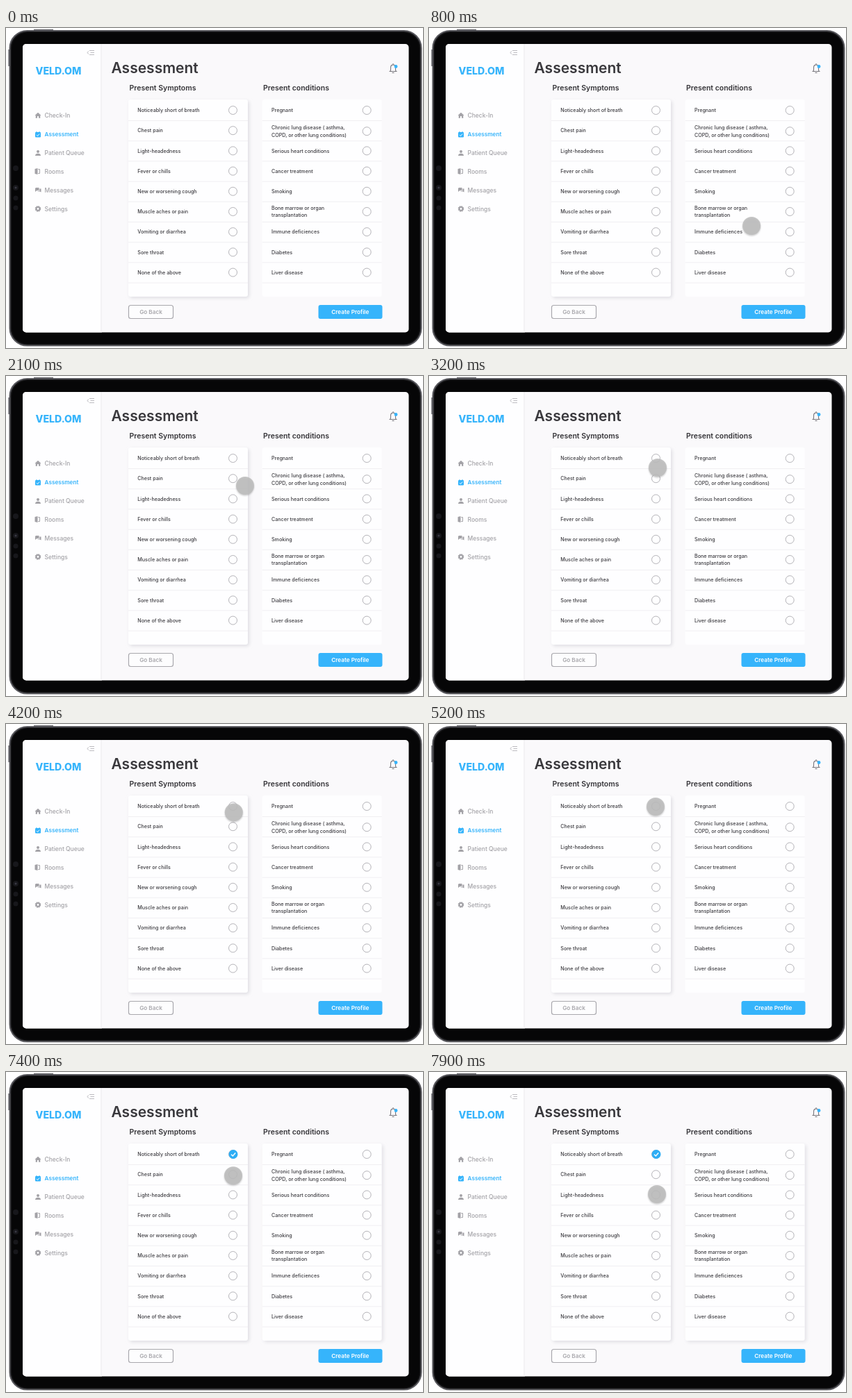
These frames come from a looping animation (600 by 461 pixels, 8 s). An HTML page:

```html
<!DOCTYPE html>
<html lang="en">
<head>
<meta charset="utf-8">
<title>Assessment</title>
<style>
  html, body { margin: 0; width: 100%; height: 100%; overflow: hidden; background: #fff; }
  svg { display: block; width: 600px; height: 461px; font-family: Inter, "Open Sans", sans-serif; }
  .item { font-size: 7.15px; font-weight: 500; fill: #3b3a3f; }
  .nav { font-size: 8.5px; font-weight: 500; fill: #a3a2a7; }
  .on { font-size: 8.2px; font-weight: 600; fill: #36b4fb; }
  .head { font-size: 10.5px; font-weight: 600; fill: #353438; }
  .btn { font-size: 8.2px; font-weight: 600; text-anchor: middle; }
  .ring { fill: none; stroke: #b4b3b8; }
  .rule { stroke: #f0eff2; }
  .icon { fill: #a3a2a7; }
</style>
</head>
<body>
<svg viewBox="0 0 600 461">
  <defs>
    <filter id="soft" x="-20%" y="-20%" width="140%" height="140%"><feGaussianBlur stdDeviation="2.5"/></filter>
    <filter id="blur" x="-40%" y="-40%" width="180%" height="180%"><feGaussianBlur stdDeviation="1.3"/></filter>
  </defs>

  <!-- tablet -->
  <path d="M40 3H68M4.500 31V55" stroke="#55555a" stroke-width="2"/>
  <rect x="5.500" y="4" width="592" height="453.500" rx="25" fill="#141416" stroke="#58585d" stroke-width="2"/>
  <rect x="8" y="6.500" width="587" height="448.500" rx="23" fill="#060607"/>
  <g fill="#17171b">
    <circle cx="14" cy="202" r="4"/><circle cx="14" cy="230" r="4"/><circle cx="14" cy="245" r="3.500"/><circle cx="14" cy="259" r="3.500"/>
  </g>
  <circle cx="14" cy="230" r="1.500" fill="#3a3a44"/>
  <rect x="24" y="23" width="555.500" height="415.500" rx="5" fill="#faf9fb"/>

  <!-- sidebar -->
  <path d="M136 23H138V438.500H136Z" fill="#f3f2f4"/>
  <path d="M29 23H136V438.500H29a5 5 0 0 1-5-5V28a5 5 0 0 1 5-5Z" fill="#fefeff"/>
  <path d="M120 32.500H127M121.500 35.500H127M120 38.500H127M119 33.500L116.800 35.500L119 37.500" fill="none" stroke="#b5b4b9" stroke-width=".9"/>
  <text x="42.500" y="67" font-size="14.200" font-weight="800" fill="#36b4fb">VELD.OM</text>
  <g class="icon">
    <path d="M41.500 126L46 121.800L50.500 126H49.300V129.800H47V127H45V129.800H42.700V126Z"/>
    <circle cx="46" cy="178" r="2"/><path d="M42 184C42 179.800 50 179.800 50 184Z"/>
    <path d="M41.500 203L45.500 202V211L41.500 210Z"/><path d="M46.300 203.500H48.500V209.500H46.300" fill="none" stroke="#a3a2a7"/>
    <path d="M43 230H47.500V234H44.500L42 236V231Z"/><path d="M48.300 231.500H50.500V236.500L48.500 235.500H45.500V234.800H48.300Z"/>
  </g>
  <circle cx="46" cy="260.500" r="2.400" fill="none" stroke="#a3a2a7" stroke-width="2"/>
  <circle cx="46" cy="260.500" r="3.700" fill="none" stroke="#a3a2a7" stroke-width="1.200" stroke-dasharray="1.900 1"/>
  <rect x="42" y="150" width="8" height="7.500" rx="1.200" fill="#36b4fb"/>
  <path d="M44 149V151M48 149V151" stroke="#36b4fb"/>
  <path d="M44 154L45.500 155.500L48.200 152.500" fill="none" stroke="#fff"/>
  <g id="nav"></g>

  <!-- page -->
  <text x="151.500" y="64.500" font-size="21" font-weight="600" fill="#39383c">Assessment</text>
  <path d="M551.500 62.500H562.500M553 62C554 60 553.300 58 553.600 56C554 52 560 52 560.400 56C560.700 58 560 60 561 62M557 51V53M555.500 64.500H558.500" fill="none" stroke="#77767c" stroke-width="1.100"/>
  <circle cx="561" cy="55.500" r="2.400" fill="#36b4fb"/>
  <text class="head" x="177.500" y="89.500">Present Symptoms</text>
  <text class="head" x="370" y="89.500">Present conditions</text>
  <rect x="178" y="105" width="172" height="284" rx="4" fill="#dedde2" filter="url(#soft)"/>
  <rect id="shade" x="371" y="105" width="172" height="284" rx="4" fill="#e2e1e6" filter="url(#soft)"/>
  <g id="lists"></g>
  <rect x="176.500" y="399.500" width="64" height="19" rx="3" fill="#fdfdfe" stroke="#a9a8ad" stroke-width="1.200"/>
  <text class="btn" x="208.500" y="412" fill="#a9a8ad">Go Back</text>
  <rect x="449.500" y="399" width="92" height="20" rx="3" fill="#36b4fb"/>
  <text class="btn" x="495.300" y="412" fill="#fff">Create Profile</text>

  <g id="check">
    <circle cx="327" cy="118.500" r="6.500" fill="#2eaef5"/>
    <path d="M324 118.700L326.300 121L330.200 116.500" fill="none" stroke="#fff" stroke-width="1.400"/>
  </g>
  <g id="cursor">
    <circle cy="1.500" r="13" fill="#000" opacity=".2" filter="url(#blur)"/>
    <circle r="13" fill="#bdbdbd" opacity=".88"/>
  </g>
</svg>
<script>
const $ = id => document.getElementById(id);
const text = (cls, x, y, s) => `<text class="${cls}" x="${x}" y="${y}">${s}</text>`;

$("nav").innerHTML = ["Check-In", "Assessment", "Patient Queue", "Rooms", "Messages", "Settings"]
  .map((s, i) => text(i === 1 ? "nav on" : "nav", 55.5, 129 + i * 26.9, s)).join("");

function list(x, items) {
  let out = `<rect x="${x}" y="103" width="172" height="284" rx="3" fill="#fefeff"/>`;
  items.forEach((item, i) => {
    const y = 118.5 + i * 29.2, lines = item.split("|"), two = lines.length > 1;
    const mid = y + (two && i === 1 ? 1 : 0);
    lines.forEach((s, k) => out += text("item", x + 13.3, mid + 2.6 + (two ? k * 10.8 - 5.6 : 0), s));
    out += `<circle class="ring" cx="${x + 150.5}" cy="${mid}" r="6"/>`;
    out += `<path class="rule" d="M${x} ${y + 15}h172"/>`;
  });
  return out;
}
$("lists").innerHTML = list(176, ["Noticeably short of breath", "Chest pain", "Light-headedness",
  "Fever or chills", "New or worsening cough", "Muscle aches or pain", "Vomiting or diarrhea",
  "Sore throat", "None of the above"]) +
  list(368.7, ["Pregnant", "Chronic lung disease ( asthma,|COPD, or other lung conditions)",
  "Serious heart conditions", "Cancer treatment", "Smoking", "Bone marrow or organ|transplantation",
  "Immune deficiences", "Diabetes", "Liver disease"]);

const linear = p => p, out = p => 1 - (1 - p) ** 2, inOut = p => p * p * (3 - 2 * p);
// cursor path: time, x, y, easing towards that point
const path = [
  [400, 645, 438, linear], [500, 600, 402, linear], [1300, 377, 210, out], [2100, 344, 158, linear],
  [2200, 339, 145, linear], [2400, 329, 129, out], [3100, 329, 129, linear], [3200, 329, 132, linear],
  [3400, 329, 135, out], [3900, 329, 135, linear], [4600, 326, 115, inOut], [4700, 326, 115, linear],
  [4900, 326, 119, linear], [5300, 326, 119, linear], [5400, 326.5, 119.5, linear],
  [6900, 326.5, 119.5, linear], [7000, 326, 124, linear], [7800, 328, 174.5, linear], [7900, 328, 176, linear]
];

function cursorAt(t) {
  const i = path.findIndex(k => k[0] >= t);
  if (i < 0) return path[path.length - 1].slice(1, 3);
  if (i === 0) return [645, 438];
  const a = path[i - 1], b = path[i], p = b[3]((t - a[0]) / (b[0] - a[0]));
  return [a[1] + (b[1] - a[1]) * p, a[2] + (b[2] - a[2]) * p];
}

function draw(now) {
  const t = Math.floor(now % 8000 / 100) * 100;   // ten poses a second
  const done = Math.min(1, Math.max(0, (t - 5700) / 500));
  $("check").setAttribute("opacity", done);
  $("shade").setAttribute("opacity", done);
  $("cursor").setAttribute("transform", `translate(${cursorAt(t)})`);
  requestAnimationFrame(draw);
}
draw(performance.now());
</script>
</body>
</html>
```
